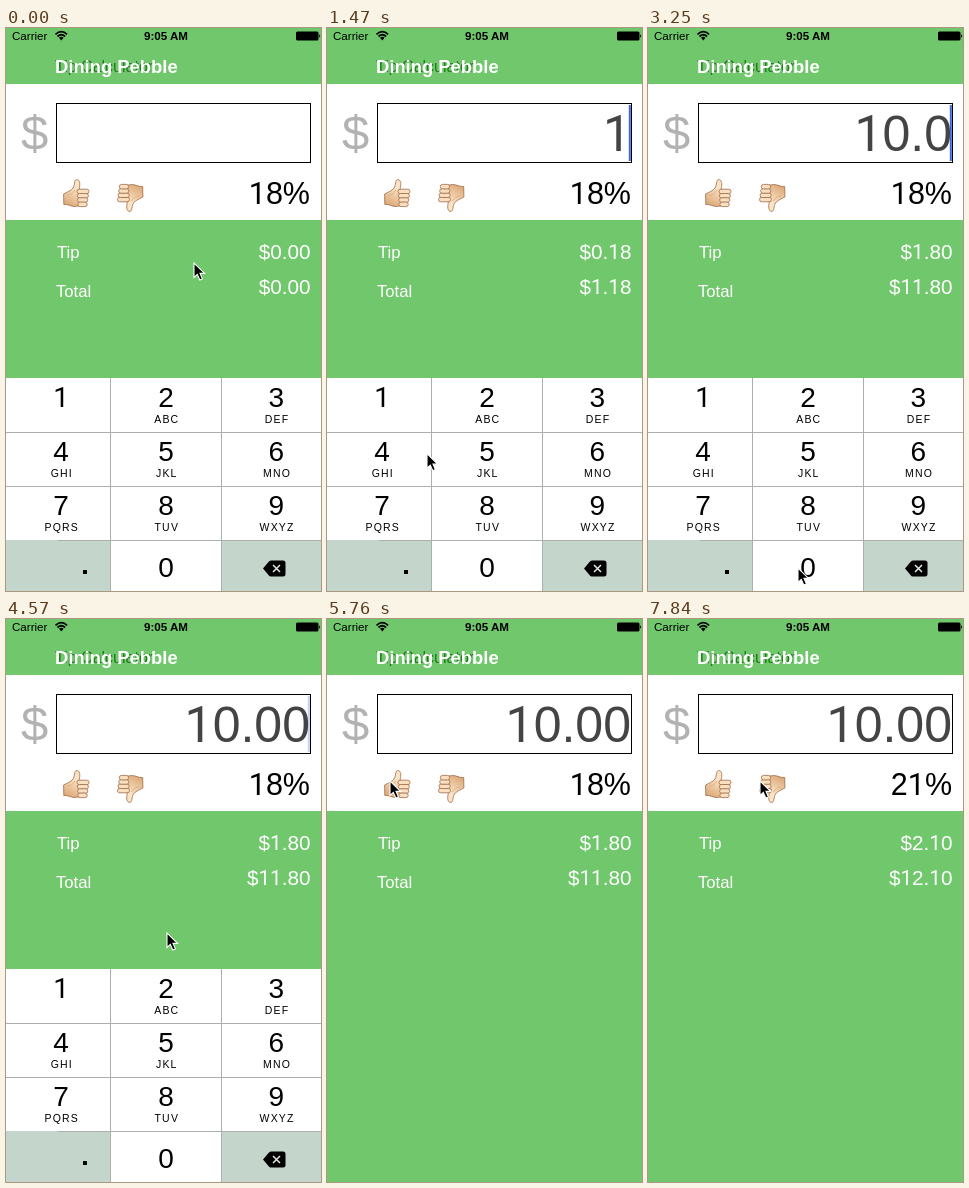
Write an HTML page that moves like this. It is 315 px wide and 563 px high and loops after 7.99 s.

```html
<!DOCTYPE html>
<html lang="en">
<head>
<meta charset="utf-8">
<title>Tip calculator</title>
<style>
  html, body { margin: 0; width: 100%; height: 100%; overflow: hidden; background: #70c76c; }
  svg { display: block; width: 315px; height: 563px; font-family: "Liberation Sans", Arial, sans-serif; }
  .mid { text-anchor: middle; }
  .end { text-anchor: end; }
  .one { font-family: Roboto, sans-serif; }
  .digit { font-size: 28px; }
  .letters { font-size: 10.5px; letter-spacing: 1.2px; }
  .sum { font-size: 20.7px; fill: #fff; }
  .label { font-size: 16.7px; fill: #fff; }
</style>
</head>
<body>
<svg viewBox="0 0 315 563">
  <defs>
    <linearGradient id="skin" x1=".7" y1="0" x2=".3" y2="1">
      <stop offset=".3" stop-color="#fae3c6"/>
      <stop offset="1" stop-color="#dca878"/>
    </linearGradient>
    <g id="thumb" stroke="#a06d48" stroke-width=".8" stroke-linejoin="round">
      <path fill="url(#skin)" d="M.6 15C4 13 8 12 10 9C12 6 11 1 13.5.6C17 .3 17.5 5 16 10.5L21 12V26L12 27.5C8 27.6 5 25 .8 25.5Z"/>
      <g id="fingers" fill="#f8dfc0"></g>
      <path fill="none" stroke="#d9ab7b" d="M4 16C8 16 10 14 12 11"/>
    </g>
  </defs>

  <rect width="315" height="563" fill="#70c76c"/>
  <rect y="56" width="315" height="136" fill="#fff"/>

  <text x="6" y="12" font-size="11.6">Carrier</text>
  <g fill="none" stroke="#000" stroke-width="1.7">
    <path d="M49.5 6.3Q55.3 1 61.1 6.3M51.5 8.5Q55.3 5 59.1 8.5"/>
    <path fill="#000" stroke="none" d="M53 9.8Q55.3 7.8 57.6 9.8L55.3 12.4Z"/>
  </g>
  <text class="mid" x="160" y="12" font-size="11.6" font-weight="bold">9:05 AM</text>
  <rect x="290" y="3.5" width="22.5" height="9" rx="1.5"/>
  <path d="M313.2 6.2Q315.2 8 313.2 9.8Z"/>

  <text x="49" y="44" font-size="16" fill="#1f7a1c">Tip Calculator</text>
  <text x="49" y="45" font-size="18.4" font-weight="bold" fill="#fff">Dining Pebble</text>

  <text x="15" y="122" font-size="49" fill="#b2b2b2">$</text>
  <rect x="50.5" y="75.5" width="254" height="59" fill="#fff" stroke="#000"/>
  <text id="amount" class="end" x="304" y="122.5" font-size="50" fill="#444"></text>
  <rect id="caret" x="301.8" y="77" width="2" height="56" fill="#3c64dc"/>

  <use id="up" href="#thumb" transform="translate(57 151)"/>
  <use href="#thumb" transform="translate(137.5 184) rotate(180)"/>
  <text id="rate" class="end" x="304" y="176" font-size="30.5"></text>

  <text class="label" x="51" y="230">Tip</text>
  <text class="label" x="50" y="269">Total</text>
  <text id="tip" class="sum end" x="304.5" y="231"></text>
  <text id="total" class="sum end" x="304.5" y="266"></text>

  <g id="pad">
    <rect y="350" width="315" height="213" fill="#fff"/>
    <path fill="#c4d5cb" d="M0 512H105V563H0ZM216 512H315V563H216Z"/>
    <rect id="pressed"/>
    <path fill="none" stroke="#abafad" d="M104.5 350V563M215.5 350V563M0 404.5H315M0 458.5H315M52 512.5H315"/>
    <g id="keys"></g>
    <rect x="77" y="542" width="4" height="4"/>
    <path d="M257 540.5L262.5 534Q263.5 532.5 265 532.5H277Q279.5 532.5 279.5 535V546Q279.5 548.5 277 548.5H265Q263.5 548.5 262.5 547Z"/>
    <path stroke="#dfe8e3" stroke-width="1.5" d="M267 537L274 544M274 537L267 544"/>
  </g>

  <path id="cursor" d="M0 0V14.5L3.3 11.4L5.8 17L8.4 15.9L6 10.4H10.6Z" stroke="#fff" stroke-width="1.1"/>
</svg>
<script>
const $ = id => document.getElementById(id);
const LOOP = 7990, STEP = 147.6, LAST = 53;

// The "1" has no foot, unlike the one in the main font.
const footless = text => text.replace(/1/g, '<tspan class="one">1</tspan>');
const show = (id, text) => { $(id).innerHTML = footless(text); };

$("fingers").innerHTML = [0, 1, 2, 3].map(i =>
  `<rect x="${14 + i * 0.3}" y="${10.2 + i * 4.3}" width="${12 - i * 0.9}" height="4.5" rx="2.2"/>`).join("");

const letters = ["", "ABC", "DEF", "GHI", "JKL", "MNO", "PQRS", "TUV", "WXYZ"];
const columns = [55, 160, 270.3];
$("keys").innerHTML = letters.map((word, i) => {
  const x = columns[i % 3], y = 379 + 54 * Math.floor(i / 3);
  return `<text class="digit mid" x="${x}" y="${y}">${footless(String(i + 1))}</text>
    <text class="letters mid" x="${x + 0.8}" y="${y + 16}">${word}</text>`;
}).join("") + '<text class="digit mid" x="160" y="549">0</text>';

// All times below are counted in steps of the screen refresh.
const path = [
  [0, 188, 235], [2, 78, 358], [3, 78, 358], [6, 75, 364], [9, 75, 364], [12, 150, 549],
  [14, 150, 549], [17, 76, 541], [19, 76, 541], [21, 150, 540], [25, 150, 540],
  [26, 151, 528], [30, 161, 320], [31, 161, 314], [34, 161, 314], [39, 63, 162],
  [51, 63, 162], [53, 112, 162]
];
const typed = [[0, ""], [9, "1"], [13, "10"], [19, "10."], [22, "10.0"], [24, "10.00"]];
const keyBoxes = {
  1: [0, 350, 104, 54, "#c4d5cb"],
  0: [105, 513, 110, 50, "#c4d5cb"],
  ".": [52, 513, 52, 50, "#fff"]
};
const presses = { 8: "1", 12: "0", 18: ".", 21: "0", 23: "0" };
const upTaps = [40, 46, 50];

function cursorAt(n) {
  const i = Math.max(1, path.findIndex(p => p[0] >= n));
  const [n0, x0, y0] = path[i - 1], [n1, x1, y1] = path[i];
  const k = (n - n0) / (n1 - n0);
  return [x0 + (x1 - x0) * k, y0 + (y1 - y0) * k];
}

function caretAt(n) {
  if (n === 31) return 0.3;
  return (n >= 1 && n <= 3) || (n >= 8 && n <= 27) || n === 32 ? 1 : 0;
}

function draw(time) {
  const n = Math.min(LAST, Math.floor((time % LOOP + 8) / STEP));
  const amount = typed.filter(([start]) => start <= n).pop()[1];
  const rate = 18 + upTaps.filter(tap => tap < n).length;
  const tip = amount * rate / 100;
  show("amount", amount);
  show("rate", rate + "%");
  show("tip", "$" + tip.toFixed(2));
  show("total", "$" + (+amount + tip).toFixed(2));
  $("caret").setAttribute("opacity", caretAt(n));
  $("up").setAttribute("opacity", upTaps.includes(n) ? 0.5 : 1);

  const [x, y, width, height, fill] = keyBoxes[presses[n]] || [0, 0, 0, 0, "none"];
  Object.entries({ x, y, width, height, fill }).forEach(([name, value]) => $("pressed").setAttribute(name, value));

  const slide = Math.min(1, Math.max(0, (n - 32) / 3));
  $("pad").setAttribute("transform", `translate(0 ${213 * slide * slide * (3 - 2 * slide)})`);
  $("cursor").setAttribute("transform", `translate(${cursorAt(n)})`);
}

function tick() {
  draw(performance.now());
  requestAnimationFrame(tick);
}
tick();
</script>
</body>
</html>
```
